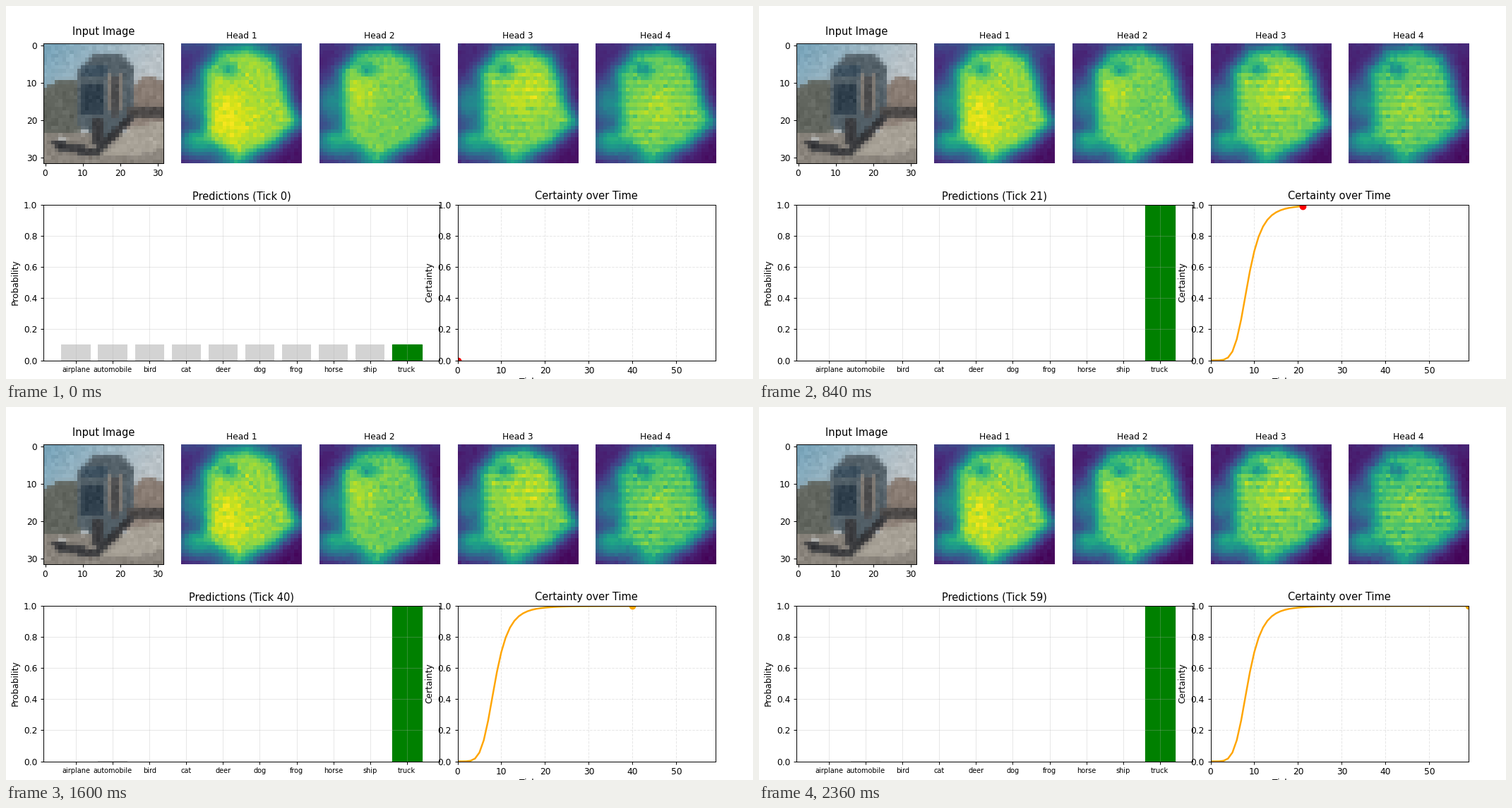
A matplotlib script for the animation above (2400 ms loop, 1058 by 529 pixels).

```python
import numpy as np
import matplotlib.pyplot as plt
from matplotlib.animation import FuncAnimation
from matplotlib.colors import to_rgb
from matplotlib.gridspec import GridSpec
from matplotlib.path import Path

W, H, DPI = 1058, 529, 88
TICKS, N = 60, 32
LABELS = ["airplane", "automobile", "bird", "cat", "deer",
          "dog", "frog", "horse", "ship", "truck"]

X, Y = np.meshgrid(np.arange(N) + 0.5, np.arange(N) + 0.5)
CELLS = np.column_stack([X.ravel(), Y.ravel()])


def inside(points):
    return Path(points).contains_points(CELLS).reshape(N, N)


def bump(x, y, sx, sy):
    return np.exp(-((X - x) / sx) ** 2 - ((Y - y) / sy) ** 2)


def signed_distance(points):
    """Distance to the outline, positive inside."""
    pts = np.array(points, float)
    dist = np.full((N, N), 1e9)
    for (ax, ay), (bx, by) in zip(pts, np.roll(pts, -1, axis=0)):
        dx, dy = bx - ax, by - ay
        s = np.clip(((X - ax) * dx + (Y - ay) * dy) / (dx * dx + dy * dy), 0, 1)
        dist = np.minimum(dist, np.hypot(X - ax - s * dx, Y - ay - s * dy))
    return np.where(inside(points), dist, -dist)


# All heads look at the same silhouette.
DIST = signed_distance([(6.5, 8), (11, 3), (18, 2), (24, 4.5), (26.5, 10),
                        (28, 16), (30.5, 21), (24, 26.5), (15, 30.5), (7, 25)])


def make_head(seed, peak, hot, stripe, haze, fade):
    """Return a function giving the attention map at progress t in 0..1."""
    rng = np.random.default_rng(seed)
    body = 1 / (1 + np.exp(-(DIST + 0.6) / 1.1))
    base = 0.04 + (peak - 0.1) * body + 0.12 * bump(*hot, 7, 7) * body
    base += 0.07 * np.exp(-(DIST / 3.5) ** 2) - 0.25 * bump(12.5, 7, 2.4, 2)
    base += (1 - body) * (haze * np.exp(-Y / 6) + 0.38 * bump(2.5, 16, 4, 6)
                          + 0.45 * bump(4, 27, 6, 4) + 0.3 * bump(14, 32, 6, 3))
    base += 0.14 * bump(3, 25, 2.5, 1.5)
    texture = rng.normal(0, 0.026, (N, N)) * (0.3 + 0.7 * body)
    texture += stripe * np.cos(np.pi * (Y - 0.5)) * body

    def field(t):
        v = base + texture * (1 + 0.35 * t) - fade * t * body - 0.03 * t
        return np.clip(v, 0.01, 0.985)
    return field


FIELDS = [
    make_head(1, 0.91, (13, 20), 0.006, 0.20, 0.00),
    make_head(2, 0.84, (9, 13), 0.008, 0.12, 0.00),
    make_head(3, 0.85, (18, 13), 0.020, 0.10, 0.00),
    make_head(4, 0.81, (17, 17), 0.024, 0.10, 0.04),
]


def make_photo():
    """Coarse scene built from flat shapes."""
    rng = np.random.default_rng(7)
    mix = np.clip((X + Y - 4) / 30, 0, 1)[..., None]
    img = (1 - mix) * to_rgb("#7ba6bb") + mix * to_rgb("#bcc5ca")

    def fill(color, *points):
        img[inside(points)] = to_rgb(color)

    def box(color, x0, y0, x1, y1):
        fill(color, (x0, y0), (x1, y0), (x1, y1), (x0, y1))

    fill("#8a7d74", (23, 12), (27, 8.5), (32, 10), (32, 24), (22, 24))
    fill("#62665f", (0, 12), (4, 10), (10, 10), (10, 25), (0, 25))
    box("#8b857d", 0, 24, 32, 32)
    fill("#a8a297", (15, 30), (24, 22), (32, 21), (32, 28), (24, 30))
    fill("#55626a", (9, 8), (13, 3), (20, 3), (24, 6), (24, 18), (16, 25), (9, 22))
    box("#3d5160", 10, 6, 17, 9)
    box("#30404d", 10, 11, 16, 19)
    for x in (17, 20):
        box("#8a827a", x, 8, x + 1, 18)
    box("#47484a", 18, 9, 20, 20)
    box("#4d4a49", 22, 17, 32, 20)
    box("#3a3b3e", 13, 20, 16, 27)
    fill("#37383b", (1.5, 25.5), (13, 28), (23, 18.5), (25, 20), (14, 30.5), (4, 28.5))
    box("#c6cac9", 4, 25, 6, 26)

    pad = np.pad(img, ((1, 1), (1, 1), (0, 0)), mode="edge")
    blur = (pad[:-2, 1:-1] + pad[2:, 1:-1] + pad[1:-1, :-2] + pad[1:-1, 2:]) / 4
    return np.clip(0.6 * img + 0.4 * blur + rng.normal(0, 0.02, (N, N, 1)), 0, 1)


# Certainty saturates along a Hill curve.
ticks = np.arange(TICKS)
certainty = 0.997 * ticks ** 5.3 / (8.5 ** 5.3 + ticks ** 5.3)

# Class probabilities: a softmax whose gain gives the matching entropy.
logits = np.full(10, -6.2)
logits[[0, 1, 9]] = -4.9, -2.88, 0


def softmax(gain):
    e = np.exp(gain[:, None] * logits)
    return e / e.sum(axis=1, keepdims=True)


gains = np.linspace(0, 4, 800)
trial = softmax(gains)
sureness = 1 + (trial * np.log(trial)).sum(axis=1) / np.log(10)
probs = softmax(np.interp(certainty, sureness, gains))

# The small margin keeps the pixel size from being rounded down.
fig = plt.figure(figsize=((W + 0.01) / DPI, (H + 0.01) / DPI), dpi=DPI,
                 facecolor="white")
grid = GridSpec(2, 5, figure=fig, height_ratios=[1, 1.3], left=0.05, right=0.95,
                bottom=0.05, top=0.9, wspace=0.15, hspace=0.3)

photo_ax = fig.add_subplot(grid[0, 0])
photo_ax.imshow(make_photo(), interpolation="nearest")
photo_ax.set_xticks(range(0, 31, 10))
photo_ax.set_yticks(range(0, 31, 10))
photo_ax.set_title("Input Image", fontsize=12, pad=10)

heads = []
for i, field in enumerate(FIELDS, 1):
    ax = fig.add_subplot(grid[0, i])
    ax.axis("off")
    ax.set_title(f"Head {i}", fontsize=10)
    heads.append(ax.imshow(field(0), cmap="viridis", vmin=0, vmax=1,
                           interpolation="nearest"))

bar_ax = fig.add_subplot(grid[1, :3])
bars = bar_ax.bar(range(10), probs[0], color=["lightgray"] * 9 + ["green"])
bars[-1].set_edgecolor("green")
bars[-1].set_linewidth(1)
bar_ax.set_xlim(-0.89, 9.89)
bar_ax.set_ylim(0, 1)
bar_ax.set_xticks(range(10), LABELS, fontsize=8)
bar_ax.set_ylabel("Probability")
bar_ax.grid(True, alpha=0.3)
bar_title = bar_ax.set_title("", fontsize=12)

line_ax = fig.add_subplot(grid[1, 3:])
line_ax.set_xlim(0, TICKS - 1)
line_ax.set_ylim(0, 1)
line_ax.set_xticks(range(0, TICKS, 10))
line_ax.set_ylabel("Certainty")
line_ax.set_title("Certainty over Time", fontsize=12)
line_ax.grid(True, alpha=0.3, linestyle="--")
curve, = line_ax.plot([], [], color="orange", lw=2)
dot, = line_ax.plot([], [], "o", ms=7)
fig.text(739 / W, 1 - 537 / H, "Tick", fontsize=10, ha="center", va="baseline")


def update(k):
    for im, field in zip(heads, FIELDS):
        im.set_data(field(k / (TICKS - 1)))
    for bar, p in zip(bars, probs[k]):
        bar.set_height(p)
    bar_title.set_text(f"Predictions (Tick {k})")
    curve.set_data(ticks[:k + 1], certainty[:k + 1])
    dot.set_data([k], [certainty[k]])
    dot.set_color("red" if k < 26 else "orange")
    return [*heads, *bars, bar_title, curve, dot]


anim = FuncAnimation(fig, update, frames=TICKS, interval=40, repeat=True,
                     repeat_delay=0, blit=False)
plt.show()
```
